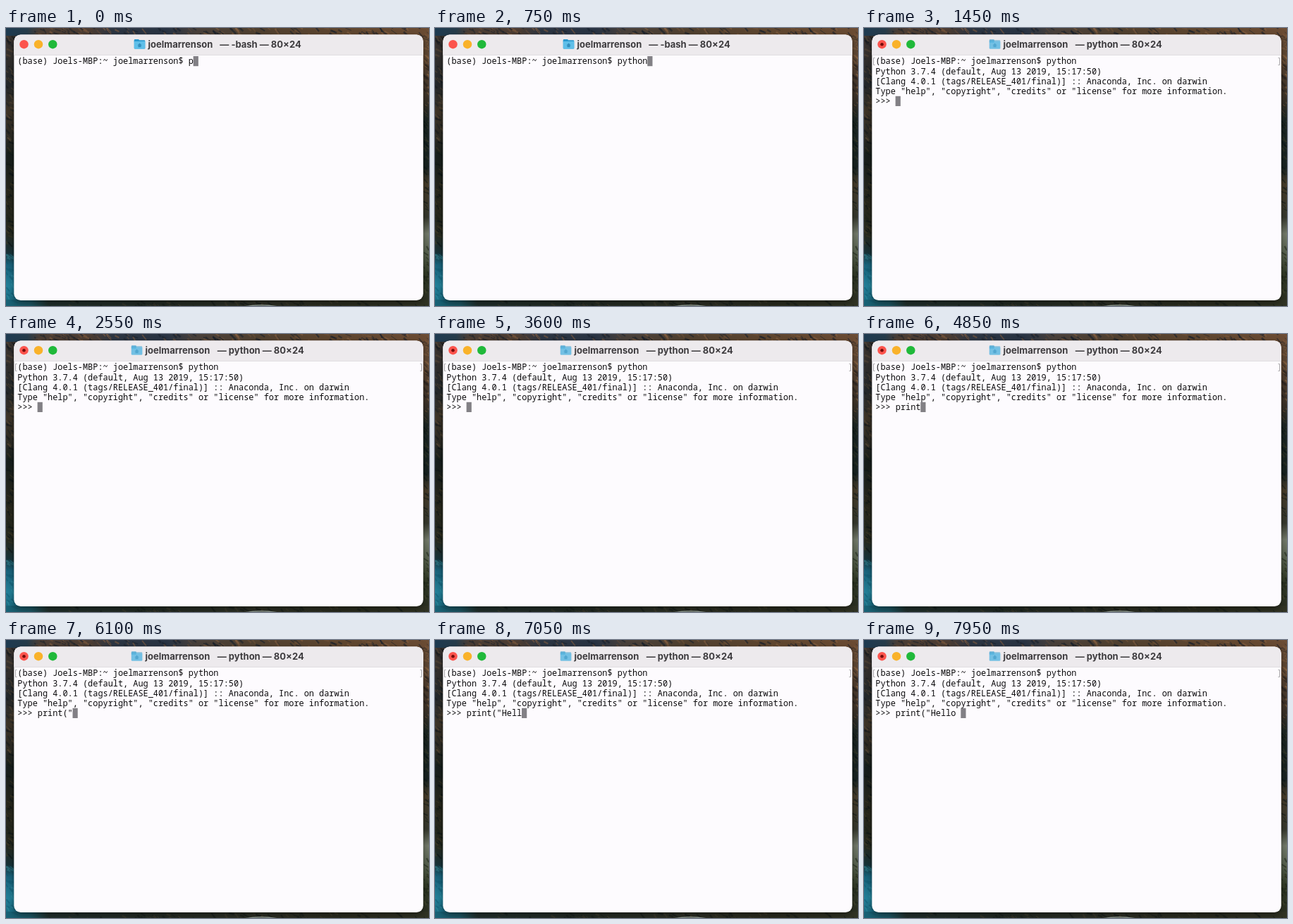
An HTML page with a canvas for the animation above (8000 ms loop, 600 by 395 pixels).

```html
<!DOCTYPE html>
<html lang="en">
<head>
<meta charset="utf-8">
<title>Terminal session</title>
<style>
  html, body { margin: 0; width: 100%; height: 100%; overflow: hidden; background: #20241f; }
  canvas { display: block; width: 600px; height: 395px; }
</style>
</head>
<body>
<canvas id="stage" width="600" height="395"></canvas>
<script>
const W = 600, H = 395, LOOP = 8000;
const CELL = 7.13, ROW = 14.2, LEFT = 16.3, BASE = 51.3;
const MONO = '500 11.88px "Noto Sans Mono", "DejaVu Sans Mono", monospace';
const BOLD = '700 13px Inter, "Open Sans", sans-serif';
const USER = 'joelmarrenson';
const PROMPT = `(base) Joels-MBP:~ ${USER}$ `;
const BANNER = [
  'Python 3.7.4 (default, Aug 13 2019, 15:17:50) ',
  '[Clang 4.0.1 (tags/RELEASE_401/final)] :: Anaconda, Inc. on darwin',
  'Type "help", "copyright", "credits" or "license" for more information.'
];

// Time in ms at which each character has been typed
const SHELL = { text: 'python', at: [0, 150, 300, 400, 500, 650] };
const REPL = {
  text: 'print("Hello ',
  at: [4250, 4350, 4500, 4600, 4750, 5350, 5750, 6500, 6700, 6850, 7000, 7200, 7500]
};
const ENTER = 950, READY = 1050;

const ctx = document.getElementById('stage').getContext('2d');

function random(seed) {
  return () => (seed = (seed * 16807) % 2147483647) / 2147483647;
}

function gradient(c, x, y, stops) {
  const g = c.createLinearGradient(0, 0, x, y);
  stops.forEach(([p, color]) => g.addColorStop(p, color));
  return g;
}

function roundRect(c, x, y, w, h, r) {
  c.beginPath();
  c.roundRect(x, y, w, h, r);
}

function disc(c, x, y, r, color) {
  c.fillStyle = color;
  c.beginPath();
  c.arc(x, y, r, 0, Math.PI * 2);
  c.fill();
}

function scatter(c, rnd, n, x, y, w, h, colors) {
  for (let i = 0; i < n; i++) {
    const px = x + rnd() * w, py = y + rnd() * h;
    c.strokeStyle = colors[Math.floor(rnd() * colors.length)];
    c.lineWidth = 0.8 + rnd() * 2;
    c.beginPath();
    c.moveTo(px, py);
    c.lineTo(px + 3 + rnd() * 6, py + 2 + rnd() * 6);
    c.stroke();
  }
}

function landscape(c) {
  c.fillStyle = gradient(c, 0, H, [
    [0, '#3c3430'], [0.1, '#33302d'], [0.2, '#22272a'], [0.3, '#3d3427'],
    [0.38, '#2d2b23'], [0.46, '#161e1c'], [0.6, '#26261b'], [0.74, '#26291e'],
    [0.81, '#173238'], [0.85, '#19627a'], [0.93, '#227f98'], [1, '#176479']
  ]);
  c.fillRect(0, 0, 300, H);
  c.fillStyle = gradient(c, 0, H, [
    [0, '#674b35'], [0.1, '#5e4632'], [0.25, '#3c3228'], [0.33, '#1b2522'],
    [0.5, '#172220'], [0.56, '#473c2a'], [0.68, '#36382d'], [0.74, '#737a6a'],
    [0.8, '#5b6552'], [0.88, '#333c28'], [1, '#292d20']
  ]);
  c.fillRect(300, 0, 300, H);
  c.fillStyle = gradient(c, W, 0, [
    [0, '#1d3a50'], [0.05, '#263c4b'], [0.08, '#4b3d34'], [0.2, '#4c3c32'],
    [0.25, '#2c3542'], [0.38, '#283343'], [0.45, '#49403a'], [0.6, '#50402f'],
    [0.8, '#5f462f'], [1, '#6a4b33']
  ]);
  c.fillRect(0, 0, W, 11);
  c.fillStyle = gradient(c, W, 0, [
    [0, '#176276'], [0.06, '#1b5461'], [0.1, '#202f2c'], [0.35, '#222a23'],
    [0.6, '#2d3025'], [0.8, '#292b1e'], [1, '#303323']
  ]);
  c.fillRect(0, 386, W, 9);

  const rnd = random(73);
  scatter(c, rnd, 150, 40, -4, 560, 14, ['#17202b99', '#8a623f88', '#20252c99', '#74533a77']);
  scatter(c, rnd, 55, -4, 10, 16, 150, ['#12191d88', '#65503a66', '#1b222588']);
  scatter(c, rnd, 45, -4, 160, 16, 145, ['#0c141599', '#4b402866', '#1b231a88']);
  scatter(c, rnd, 20, -4, 315, 16, 75, ['#3b9eaf55', '#0c526a66']);
  scatter(c, rnd, 50, 590, 10, 10, 110, ['#251f1d88', '#91684466', '#332a2388']);
  scatter(c, rnd, 40, 590, 120, 10, 140, ['#0b161688', '#3e3e2866']);
  scatter(c, rnd, 25, 590, 310, 10, 75, ['#1a211688', '#5c5a3855']);
  scatter(c, rnd, 70, 45, 387, 550, 8, ['#121a1888', '#4a443066']);

  c.strokeStyle = '#8d9891';
  c.lineWidth = 1.4;
  c.beginPath();
  c.moveTo(338, 396);
  c.quadraticCurveTo(362, 391.5, 386, 396);
  c.stroke();
}

function windowFrame(c) {
  c.save();
  c.shadowColor = 'rgba(0,0,0,.45)';
  c.shadowBlur = 9;
  c.shadowOffsetY = 3;
  c.fillStyle = '#fdfbfe';
  roundRect(c, 11.3, 9.5, 580.5, 377.5, 9.5);
  c.fill();
  c.restore();

  c.save();
  c.clip();
  c.fillStyle = '#edeaed';
  c.fillRect(11, 9, 582, 29);
  c.fillStyle = '#dad7da';
  c.fillRect(11, 38, 582, 0.8);
  c.restore();

  disc(c, 25.5, 23.2, 6.2, '#fc544d');
  disc(c, 46, 23.2, 6.2, '#f9b22a');
  disc(c, 66.3, 23.2, 6.2, '#20b93a');
}

function makeBackdrop() {
  const layer = document.createElement('canvas');
  layer.width = W;
  layer.height = H;
  const c = layer.getContext('2d');
  landscape(c);
  windowFrame(c);
  return layer;
}

function folder(x, faded) {
  ctx.save();
  ctx.globalAlpha = faded ? 0.52 : 1;
  ctx.fillStyle = '#2c9bd0';
  roundRect(ctx, x, 16, 7, 5, 1.2);
  ctx.fill();
  roundRect(ctx, x, 17.2, 15.5, 12.3, 1.3);
  ctx.fill();
  ctx.fillStyle = '#5fbfe9';
  roundRect(ctx, x, 19, 15.5, 10.7, 1.2);
  ctx.fill();
  ctx.fillStyle = '#338fbd';
  ctx.beginPath();
  ctx.moveTo(x + 4.7, 24.4);
  ctx.lineTo(x + 7.75, 21.6);
  ctx.lineTo(x + 10.8, 24.4);
  ctx.lineTo(x + 9.8, 24.4);
  ctx.lineTo(x + 9.8, 27.2);
  ctx.lineTo(x + 5.7, 27.2);
  ctx.lineTo(x + 5.7, 24.4);
  ctx.fill();
  ctx.restore();
}

function titleBar(running) {
  const shift = running ? 4 : 0;
  folder(181.8 - shift, running);
  ctx.font = BOLD;
  ctx.fillStyle = '#3d3b3e';
  ctx.textAlign = 'left';
  ctx.fillText(USER, 201.5 - shift, 27.6);
  ctx.textAlign = 'right';
  ctx.fillText(`— ${running ? 'python' : '-bash'} — 80×24`, 418.7 + shift, 27.6);
  ctx.textAlign = 'left';
  if (running) disc(ctx, 25.5, 23.2, 2.3, '#750c0b');
}

function printRow(text, row) {
  ctx.font = MONO;
  ctx.fillStyle = '#0b0a0c';
  [...text].forEach((ch, i) => ctx.fillText(ch, LEFT + i * CELL, BASE + row * ROW));
}

function cursor(col, row) {
  ctx.fillStyle = '#828085';
  ctx.fillRect(LEFT - 0.2 + col * CELL, 40 + row * ROW, 7.2, 14.2);
}

function marks() {
  ctx.strokeStyle = '#aaa8ab';
  ctx.lineWidth = 1;
  ctx.beginPath();
  for (const [x, d] of [[13.5, 2], [589.5, -2]]) {
    ctx.moveTo(x + d, 42.5);
    ctx.lineTo(x, 42.5);
    ctx.lineTo(x, 52.5);
    ctx.lineTo(x + d, 52.5);
  }
  ctx.stroke();
}

function typed({ text, at }, t) {
  return text.slice(0, at.filter(time => time <= t).length);
}

const backdrop = makeBackdrop();

function draw(t) {
  ctx.drawImage(backdrop, 0, 0);
  titleBar(t >= ENTER);

  const command = PROMPT + typed(SHELL, t);
  printRow(command, 0);
  if (t >= ENTER) marks();

  if (t >= READY) {
    const input = '>>> ' + typed(REPL, t);
    BANNER.forEach((text, i) => printRow(text, i + 1));
    printRow(input, 4);
    cursor(input.length, 4);
  } else if (t >= ENTER) {
    cursor(0, 1);
  } else {
    cursor(command.length, 0);
  }
}

const start = performance.now();
function tick() {
  draw((performance.now() - start) % LOOP);
  requestAnimationFrame(tick);
}
tick();
</script>
</body>
</html>
```
